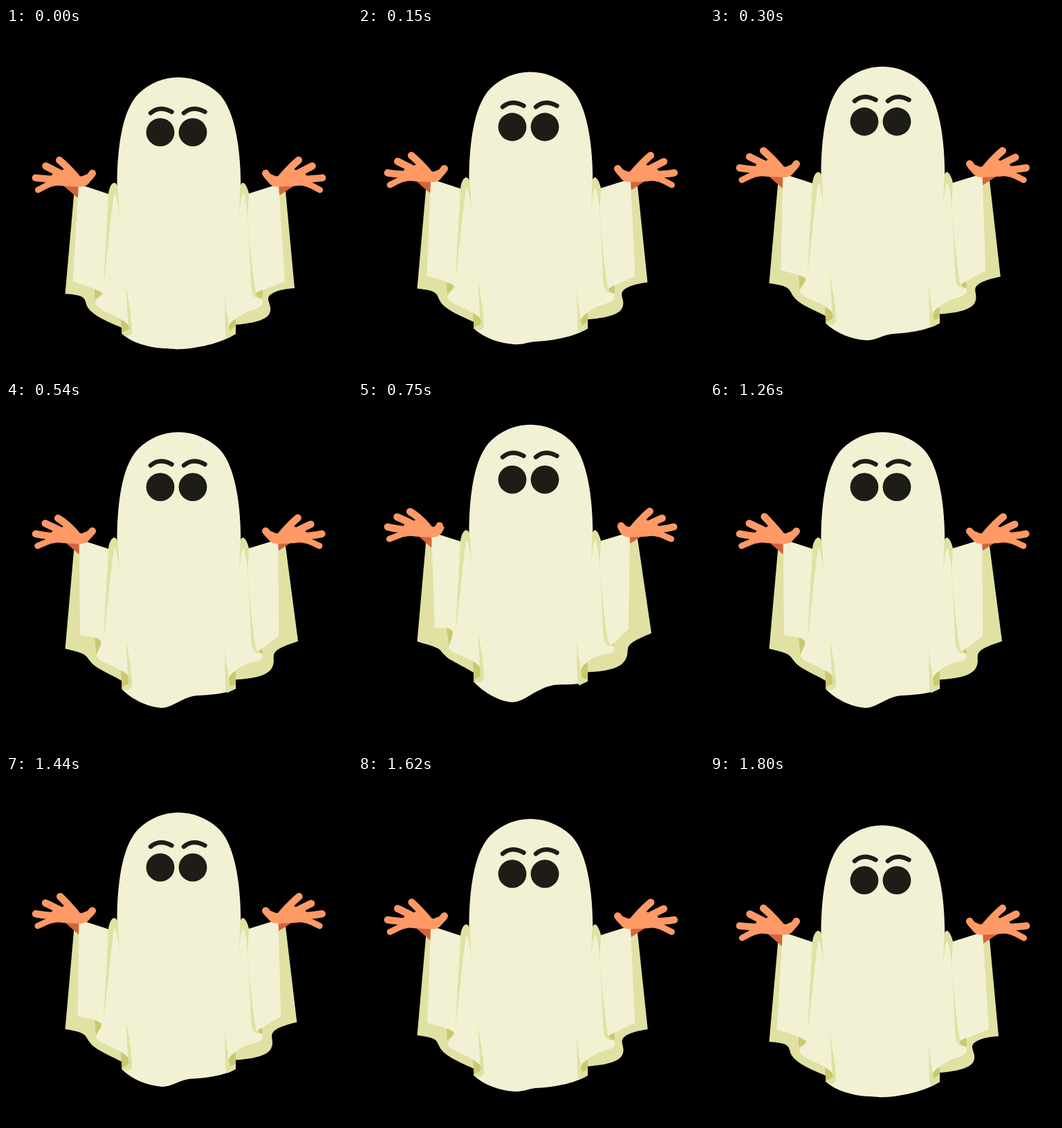
Recreate the animation shown at these times as an HTML page. Size 500 by 500 pixels, loop 1.86 s.

```html
<!DOCTYPE html>
<html lang="en">
<head>
<meta charset="utf-8">
<title>Ghost</title>
<style>
html, body { margin: 0; width: 100%; height: 100%; overflow: hidden; background: #000; }
svg { display: block; width: 100vw; height: 100vh; }
</style>
</head>
<body>
<svg id="stage" viewBox="0 0 500 500"><g id="ghost"></g></svg>
<script>
const NS = 'http://www.w3.org/2000/svg';
const LIGHT = '#f2f1d3', SHADE = '#e0e1a3', DARK = '#c9c970';
const SKIN = '#ff9966', WRIST = '#d4653a', INK = '#1d1c16';
const LOOP = 1860, STEP = 30, TURN = 900, SPAN = 750, RISE = 38.6;

// Each shape: colour, low pose, high pose (same commands in both).
const shapes = [
  // sleeve linings
  [SHADE, 'M98.5 237 L85.5 384 C98 385 110 386 113.5 392 C117 399 115 403 126 412 C137 421 154 427 168 433.5 L170 250 Z',
          'M98.5 237 L85.5 384.5 C96 388 106 390 114 394 C120 396 122 403 132 410 C144 417 155 422 168 430 L170 250 Z'],
  [SHADE, 'M404 236 L417 376 C400 377 382 381 379 390 C378 396 385 403 381 412 C376 424 350 427 331 429 L330 250 Z',
          'M404 236 L424 372.5 C407 380 391 386 390 395 C389 401 390 406 385 413 C376 426 350 428 331 429 L330 250 Z'],
  // wrists
  [WRIST, 'M82 227 L107 227 L104 246 Z', 'M86 231 L108 231 L106 249 Z'],
  [WRIST, 'M418 227 L393 227 L395 242 Z', 'M412 231 L392 231 L393.5 243 Z'],
  // left sleeve
  [DARK,  'M128 370 L139 383 C136 389 130 390 128 392 Z',
          'M128 364 L137 370 C137 380 133 389 132 395 L128 394 Z'],
  [LIGHT, 'M105 225.5 L150 240.5 L165 232 L180 430 L174 427 C164 415 129 408 129 397 C130 391 138 389 140 384 C139 382 134 380 128 377 L96.5 366 Z',
          'M106 226.5 L150 240.5 L165 232 L180 426 L174 420 C163 408 135 402 131 395 C131 388 137 380 137 372 C137 367 132 365 128 365 L111 364.5 Z'],
  // right sleeve
  [LIGHT, 'M350 239.5 L394 225.5 L403 366 L361 383 C357 386 361 390 370 391 C373 400 368 403 358 407 C345 411 335 417 328 424 L320 400 L338 232 Z',
          'M350 239.5 L393 226.5 L391 366.5 L369 387.5 C368 389 369 391 370 392 C373 399 366 402 356 403 C345 405 333 411 328 418 L320 400 L338 232 Z'],
  [DARK,  'M361 383 L370 378 Q372 385 370 391 Q361 389 361 383 Z',
          'M367 389 L369 387.5 Q371 390 370 392 Q368 391 367 389 Z'],
  // body
  [LIGHT, 'M160.5 230 C160.5 160 171.5 115 191.5 95 C207.5 79.5 228 71.3 249 71.3 C270 71.3 290.5 79.5 306.5 94 C326.5 112 339.3 160 339.3 230 L332 420 L332 442 C310 456 275 463.5 248 464.3 C243 464 238 463.5 228 463 C205 461.5 182 455 167.5 442 L167.5 425 Z',
          'M160.5 230 C160.5 160 171.5 115 191.5 95 C207.5 79.5 228 71.3 249 71.3 C270 71.3 290.5 79.5 306.5 94 C326.5 112 339.3 160 339.3 230 L332 420 L332 442 C319 448 300 446 283 447.5 C255 453 240 473 222 472.3 C205 471 182 459 167.5 443 L167.5 425 Z'],
  // shoulder folds
  [SHADE, 'M148 240 C150 222 160 218 162 233 L164 278 C163 262 160 240 157 239 C154 241 150 300 141 372 C143 325 147 270 148 240 Z'],
  [SHADE, 'M338 232 C340 218 347 223 351 239 L349.5 268 C351 310 356 350 361 383 C359 386 362 389 370 391 C360 391 356 388 355 378 C352 340 351 250 343 239 C339 242 338 262 337 278 Z',
          'M338 232 C340 218 347 223 351 239 L349.5 268 C351 310 356 350 361 384 C363 387 366 389 370 392 C360 391 356 388 355 378 C352 340 351 250 343 239 C339 242 338 262 337 278 Z'],
  // lower folds
  [SHADE, 'M173 370 C178 400 182 420 182 440 Q178 448 167.5 442 L167.5 438 L177 435 Q178 430 176 424 C176 410 174 390 173 370 Z',
          'M173 368 C178 398 182 418 182 438 Q180 446 167.5 443 L167.5 438 L177 432 Q178 426 176 420 C176 408 174 388 173 368 Z'],
  [DARK,  'M166 421 Q172 424 176 428 Q179 432 177 436 L167.5 440 Z',
          'M166 413.5 Q174 417 176.5 422 Q178 430 176 435 L167.5 440 Z'],
  [SHADE, 'M316 384 C318 410 321 420 322 430 L324 437 L332 430 L332 442 L320 448 C316 445 317 430 316 384 Z',
          'M316 384 C318 404 321 416 322 426 L324 437 L332 437 L332 442 L320 448 C316 445 317 430 316 384 Z'],
  [DARK,  'M332 420.5 Q324 424 322 431 L324 438 L332 430 Z',
          'M332 414.5 Q324 418 322 427 L324 438 L332 439 Z']
];

// Finger wiggle on top of the drift: time, index dx dy, thumb dx dy.
const wiggle = [
  [0, 0, 0, 0, 0], [300, 0, 0, 0, 0], [540, -2, 1.5, 0, 1],
  [750, -2, 1.5, -7, 3], [1050, 2, -1, 0, 1.5], [1440, 1, -.5, 0, 1], [1800, 0, 0, 0, 0]
];
const sides = [
  { flip: '', second: [-1, .7], third: [0, -2], little: [-1, -2], bend: [1, 1], curl: 1 },
  { flip: 'translate(500 0) scale(-1 1) ', second: [3, 2.5], third: [1, -2], little: [1, -2], bend: [-.6, .7], curl: .7 }
];

const ghost = document.getElementById('ghost');
function add(tag, attrs, parent = ghost) {
  const el = document.createElementNS(NS, tag);
  for (const key in attrs) el.setAttribute(key, attrs[key]);
  return parent.appendChild(el);
}
const number = /-?[\d.]+/g;
function mix(low, high, k) {
  const ends = high.match(number);
  let i = 0;
  return low.replace(number, n => (+n + (ends[i++] - n) * k).toFixed(2));
}
function sample(t) {
  const i = Math.max(1, wiggle.findIndex(row => row[0] >= t));
  const a = wiggle[i - 1], b = wiggle[i], p = (t - a[0]) / (b[0] - a[0]);
  return a.slice(1).map((v, j) => v + (b[j + 1] - v) * p);
}

const parts = shapes.map(([fill, low, high]) => ({ el: add('path', { fill, d: low }), low, high }));

for (const cx of [223, 270]) add('circle', { cx, cy: 150.7, r: 20.4, fill: INK });
const brows = add('path', {
  d: 'M209 122.8 Q222 111.5 239.5 121.2 M257 122.8 Q270 111.5 287.5 121.2',
  fill: 'none', stroke: INK, 'stroke-width': 6.4, 'stroke-linecap': 'round'
});

for (const side of sides) {
  side.group = add('g', { fill: SKIN, stroke: SKIN, 'stroke-linecap': 'round' });
  add('path', {
    d: 'M80 206 L91 200 C98 206 103 213 109 214.5 L118 211 L125 215 C121 226 115 230 106 229.5 L84 228.5 C78 228 74 227 67 229 L60 223 L67 211 Z',
    stroke: 'none'
  }, side.group);
  side.fingers = [10.5, 10.5, 10.3, 8.8, 10.5].map(w => add('path', { fill: 'none', 'stroke-width': w }, side.group));
}

function drawHand(side, t, k) {
  const [ix, iy, tx, ty] = sample(t);
  const [bx, by] = side.bend;
  const move = ([x, y]) => [x * k, y * k];
  const [sx, sy] = move(side.second), [hx, hy] = move(side.third), [lx, ly] = move(side.little);
  const lines = [
    `M${77.2 + ix * bx} ${191 + iy * by} Q88 200 101 215`,
    `M${57.5 + sx} ${199.5 + sy} Q70 206 84 213`,
    `M${42.8 + hx} ${216.5 + hy} Q56 218 76 219`,
    `M${46.3 + lx} ${234 + ly} Q58 227 72 222`,
    `M${124.8 + tx * side.curl} ${210 + ty} Q${119 + tx * .5} 219 111 222.5`
  ];
  side.fingers.forEach((el, i) => el.setAttribute('d', lines[i]));
  side.group.setAttribute('transform', `${side.flip}translate(0 ${4.5 * k})`);
}

function draw(t) {
  const k = (TURN - Math.abs(t - TURN)) / SPAN;
  ghost.setAttribute('transform', `translate(0 ${-RISE * k})`);
  for (const { el, low, high } of parts) if (high) el.setAttribute('d', mix(low, high, k));
  brows.setAttribute('transform', `translate(0 ${-4.6 * k})`);
  for (const side of sides) drawHand(side, t, k);
}

const start = performance.now();
function tick() {
  const t = (performance.now() - start) % LOOP;
  draw(Math.min(Math.floor(t / STEP) * STEP, 2 * TURN));
  requestAnimationFrame(tick);
}
tick();
</script>
</body>
</html>
```
